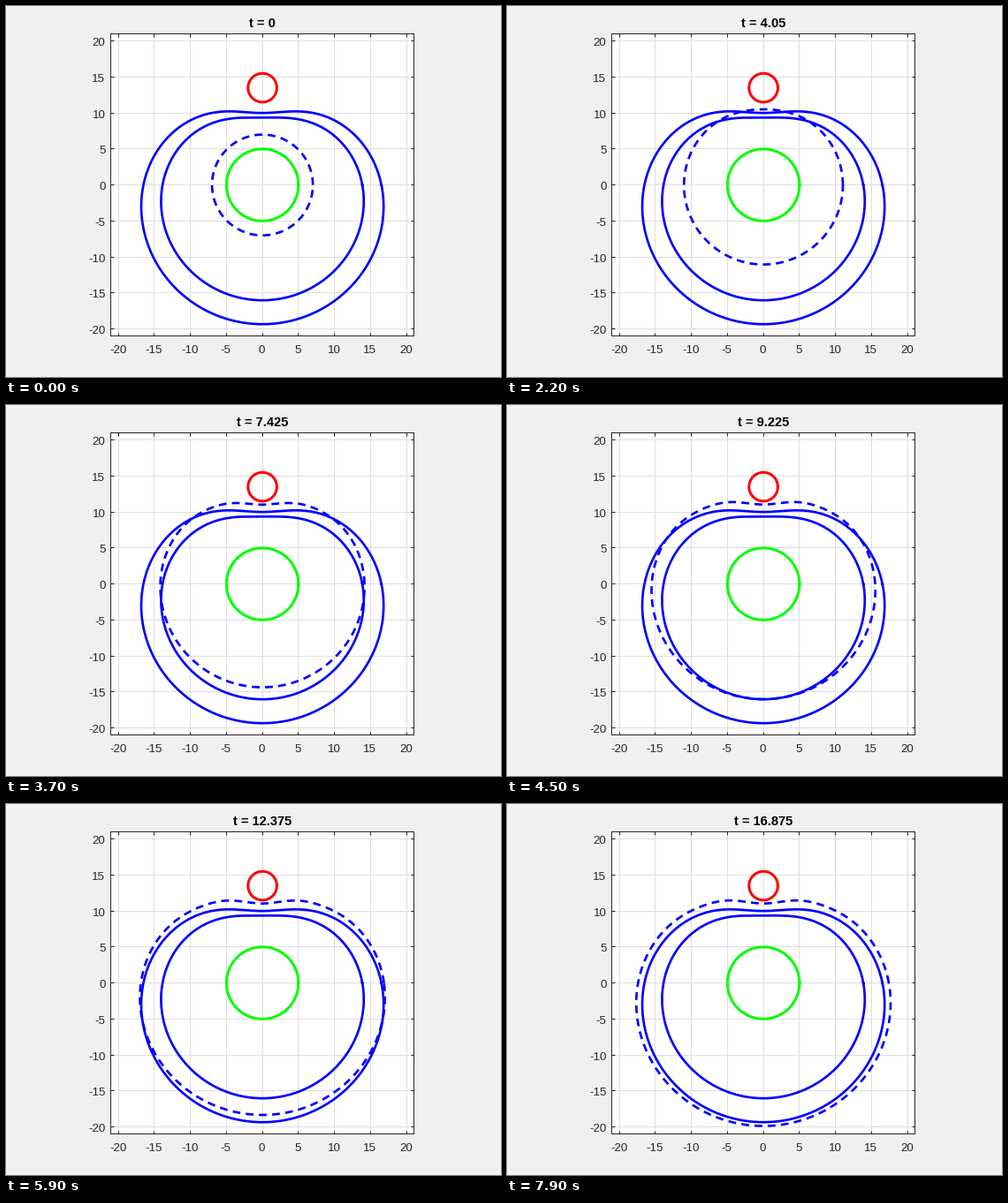
These frames come from a looping animation (560x420 px, 8000 ms). A matplotlib script:

```python
import numpy as np
import matplotlib.pyplot as plt
from matplotlib.animation import FuncAnimation
from matplotlib.transforms import Affine2D

W, H, DPI = 560, 420, 80
PX = 72 / DPI                       # one pixel in points
STEP, HOLD, FRAMES = 0.225, 4, 80
RED_Y = 13.5
CX, CY, SIDE = 289.6, 202.1, 342.3  # plot centre and side in pixels
INK = "#262626"

plt.rcParams.update({
    "font.family": "Liberation Sans",
    "axes.unicode_minus": False,
    "axes.edgecolor": INK,
    "axes.linewidth": PX,
})

theta = np.linspace(0, 2 * np.pi, 721)
up = np.sin(theta)
off_top = np.arccos(np.clip(up, -1, 1))


def polar(r):
    return r * np.cos(theta), r * up


def oval(base, k, dent):
    """Radius that grows with the root of the distance to the red disc."""
    r = np.full_like(theta, 12.0)
    gain = k - dent * np.cos(theta) ** 2
    for _ in range(80):
        gap = np.sqrt(r * r + RED_Y ** 2 - 2 * RED_Y * r * up)
        r = base + np.sqrt(gain * gap)
    return r


outer = oval(5.473, 5.855, 0.136)
inner = oval(5.373, 3.840, 0.113)

# The front grows at unit speed and levels off just outside the outer oval.
limit = outer + 1 + 0.35 * np.exp(-((off_top - 0.4) / 0.25) ** 2)
sharp = 9 + 5 * np.clip(up, 0, 1) ** 40


def front(t):
    free = 7 + t
    return free * (1 + (free / limit) ** sharp) ** (-1 / sharp)


fig = plt.figure(figsize=(W / DPI, H / DPI), dpi=DPI, facecolor="#f0f0f0")
ax = fig.add_axes([(CX - SIDE / 2) / W, 1 - (CY + SIDE / 2) / H, SIDE / W, SIDE / H])
ax.set(xlim=(-21, 21), ylim=(-21, 21))
ticks = np.arange(-20, 21, 5)
ax.set_xticks(ticks)
ax.set_yticks(ticks)
ax.set_axisbelow(True)
ax.grid(color="#dedede", lw=PX)
ax.tick_params(direction="in", length=3.5 * PX, width=PX, color=INK,
               labelcolor=INK, labelsize=13.33 * PX, top=True, right=True)
ax.tick_params(axis="x", pad=10.5 * PX)
ax.tick_params(axis="y", pad=6 * PX)
for label in ax.get_yticklabels():
    label.set_transform(label.get_transform() + Affine2D().translate(0, -1.5))

# Grid lines snap to whole pixels; curves sit on the pixel centres.
centred = ax.transData + Affine2D().translate(0.5, -0.5)


def curve(x, y, color, width, **style):
    return ax.plot(x, y, color=color, lw=width * PX, transform=centred, **style)[0]


curve(*polar(outer), "#0000ff", 2.67)
curve(*polar(inner), "#0000ff", 2.67)
wave = curve(*polar(front(0)), "#0000ff", 2.67,
             ls=(0, (3.3, 2.3)), dash_capstyle="butt")
x, y = polar(1.0)
curve(5 * x, 5 * y, "#00ff00", 3)
curve(2 * x, RED_Y + 2 * y, "#ff0000", 3)

title = fig.text(290 / W, 1 - 24 / H, "", ha="center", va="baseline",
                 size=14.67 * PX, weight="bold", color="black")


def draw(frame):
    t = max(0, frame - HOLD) * STEP
    wave.set_data(*polar(front(t)))
    title.set_text(f"t = {t:.6g}")
    return wave, title


anim = FuncAnimation(fig, draw, frames=FRAMES, interval=100, repeat=True,
                     repeat_delay=0, init_func=lambda: draw(0))
plt.show()
```
